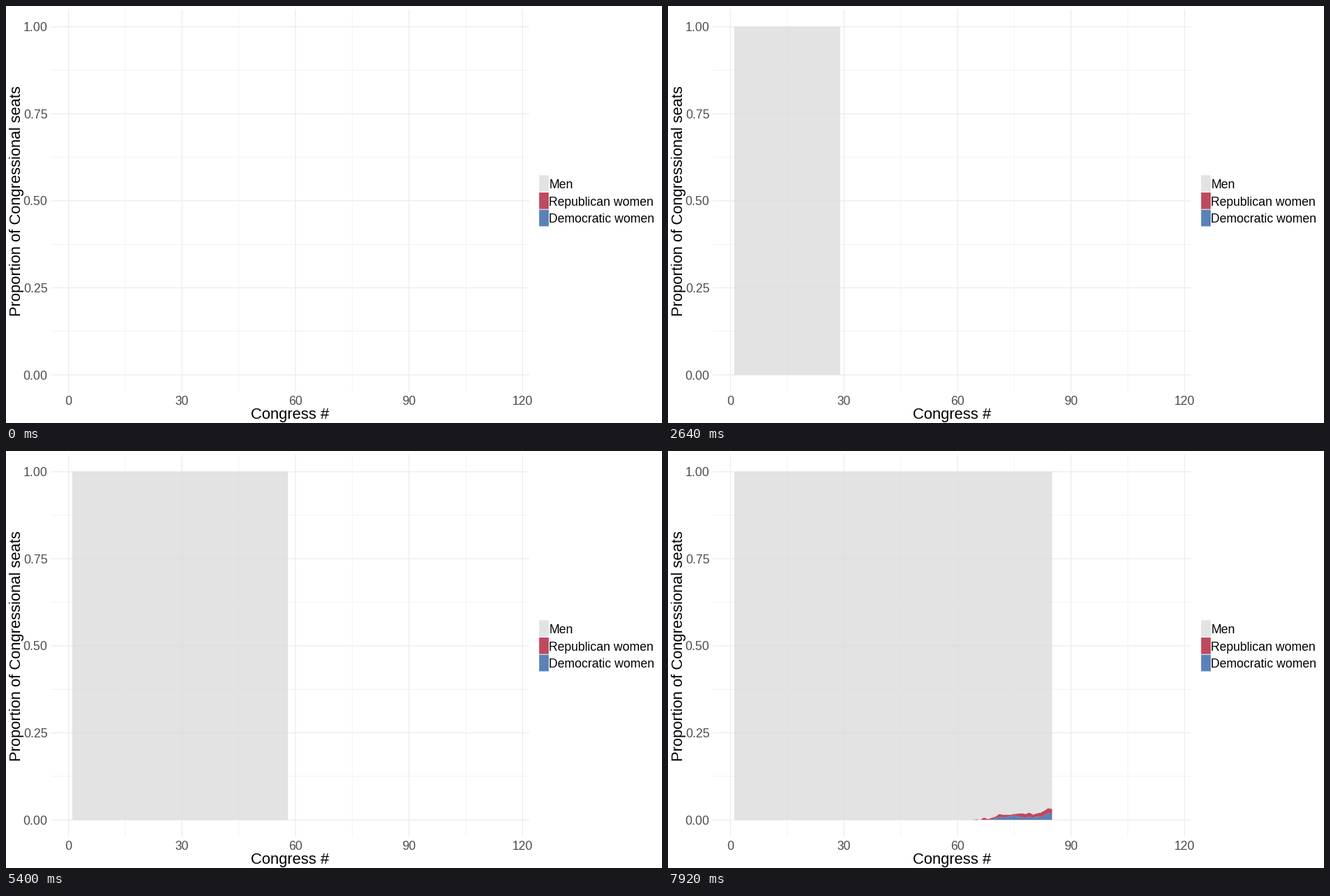
Recreate the animation shown at these times as a matplotlib script. Size 938x597 px, loop 8 s.

```python
import numpy as np
import matplotlib.pyplot as plt
from matplotlib.animation import FuncAnimation
from matplotlib.patches import Polygon, Rectangle

W, H, DPI = 938, 597, 64
LEFT, RIGHT, TOP, BOTTOM = 64, 748, 5, 552.5
TICK_MS, STEP_TICKS = 40, 3          # a new step every 120 ms
LOOP_TICKS = 200

GREY, RED, BLUE = "#dcdcdc", "#ae1d36", "#3263a6"
ALPHA = 0.8

# share of seats in thousandths, from congress 64 on
FIRST = 64
DEM = [0, 0, 0, 0, 0, 2, 4, 7, 8, 8, 11, 13, 9, 8, 6, 10, 5, 10, 8, 13, 19, 18]
WOMEN = [0, 2, 0, 7, 2, 6, 9, 17, 15, 15, 15, 17, 18, 19, 17, 21, 15, 19, 21,
         27, 34, 31]

plt.rcParams["font.family"] = "Liberation Sans"


def px(n):
    return 89.35 + 5.41 * np.asarray(n, float)


def py(share):
    return 528.1 - 498.4 * np.asarray(share, float)


def points(size):
    return size * 72 / DPI


fig = plt.figure(figsize=(W / DPI, H / DPI), dpi=DPI, facecolor="white")
ax = fig.add_axes([0, 0, 1, 1])
ax.set_xlim(0, W)
ax.set_ylim(H, 0)
ax.axis("off")


def line(xs, ys, width):
    ax.plot(xs, ys, color="#ebebeb", lw=points(width), snap=False,
            solid_capstyle="butt", zorder=1)


def label(x, y, text, size, color="black", **kw):
    ax.text(x, y, text, fontsize=points(size), color=color,
            va="baseline", **kw)


def grid(xs, ys, width):
    for x in px(xs):
        line([x, x], [TOP, BOTTOM], width)
    for y in py(ys):
        line([LEFT, RIGHT], [y, y], width)


grid(np.arange(15, 120, 30), np.arange(0.125, 1, 0.25), 0.6)
grid(np.arange(0, 121, 30), np.arange(0, 1.01, 0.25), 1.2)

for n in range(0, 121, 30):
    label(px(n), 571, str(n), 17.6, "#4d4d4d", ha="center")
for share in np.arange(0, 1.01, 0.25):
    label(59.3, py(share) + 6.5, f"{share:.2f}", 17.6, "#4d4d4d", ha="right")

label(406, 590.5, "Congress #", 22, ha="center")
label(20.6, 279, "Proportion of Congressional seats", 22, ha="center",
      rotation=90, rotation_mode="anchor")

legend = [("Men", GREY), ("Republican women", RED), ("Democratic women", BLUE)]
for i, (name, color) in enumerate(legend):
    y = 242.3 + 24.7 * i
    ax.add_patch(Rectangle((762.3, y), 13.7, 23.7, color=color, alpha=ALPHA,
                           lw=0, snap=False))
    label(776.4, y + 18.7, name, 17.6, ha="left")

# stacked boundaries, bottom to top
congress = np.arange(1, FIRST + len(DEM))
pad = np.zeros(FIRST - 1)
dem = np.concatenate([pad, DEM]) / 1000
women = np.concatenate([pad, WOMEN]) / 1000
levels = [np.zeros_like(dem), dem, women, np.ones_like(dem)]

areas = []
for color in (BLUE, RED, GREY):
    area = Polygon(np.zeros((3, 2)), closed=True, facecolor=color,
                   edgecolor="none", lw=0, alpha=ALPHA, snap=False, zorder=2)
    areas.append(ax.add_patch(area))


def update(tick):
    step = tick // STEP_TICKS
    last = int(round(1.09 + 1.2655 * step))
    x = px(congress[:last])
    for area, low, high in zip(areas, levels, levels[1:]):
        edge_x = np.concatenate([x, x[::-1]])
        edge_y = np.concatenate([py(low[:last]), py(high[:last])[::-1]])
        area.set_xy(np.column_stack([edge_x, edge_y]))
        area.set_visible(last > 1)
    return areas


anim = FuncAnimation(fig, update, frames=LOOP_TICKS, interval=TICK_MS,
                     repeat=True, repeat_delay=0, blit=False)
plt.show()
```
